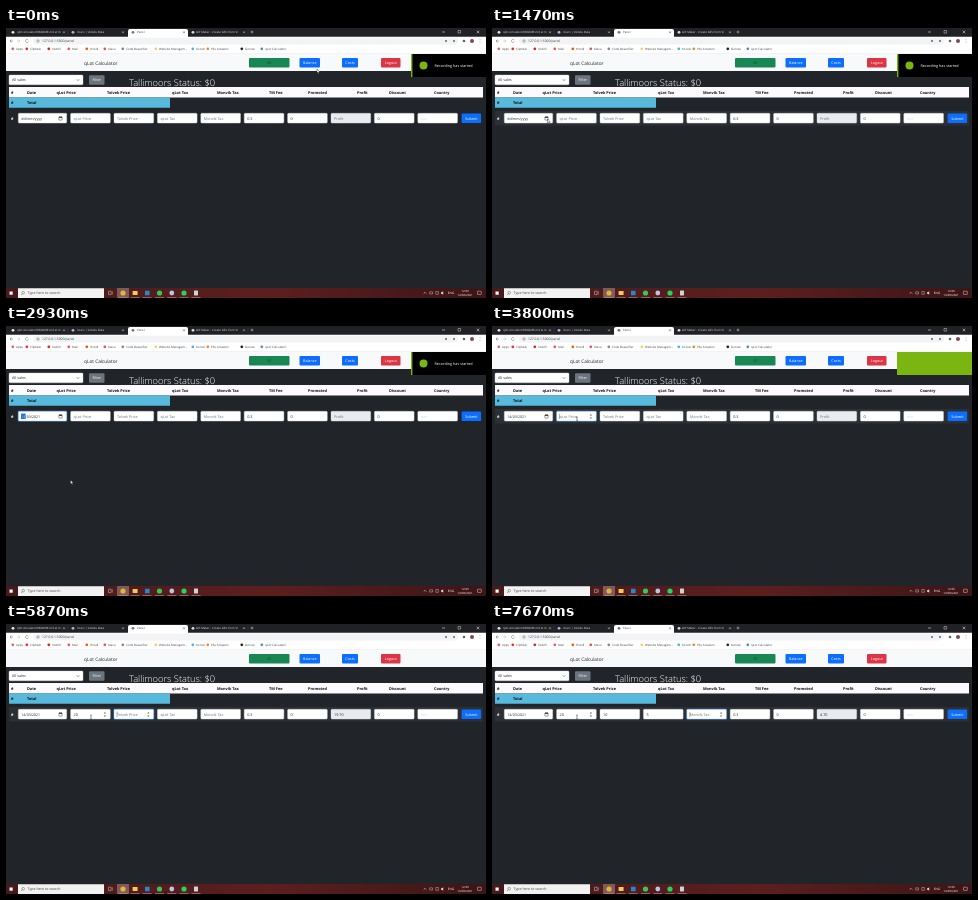
These frames come from a looping animation (480 px wide and 270 px high, 8 s). An HTML page with a canvas:

```html
<!DOCTYPE html>
<html lang="en">
<head>
<meta charset="utf-8">
<title>Sales panel</title>
<style>
html, body { margin: 0; width: 100%; height: 100%; overflow: hidden; background: #212529; }
canvas { display: block; width: 100vw; height: 100vh; }
</style>
</head>
<body>
<canvas id="stage"></canvas>
<script>
const LOOP = 8000, W = 480, H = 270;
const canvas = document.getElementById('stage');
const ctx = canvas.getContext('2d');
const BLUE = '#0d6efd', INK = '#212529', GREEN = '#7ab511';
const PICKER_OPEN = 1670, PICKED = 2800;

function box(x, y, w, h, fill, radius = 0, stroke) {
  ctx.beginPath();
  ctx.roundRect(x, y, w, h, radius);
  ctx.fillStyle = fill;
  ctx.fill();
  if (stroke) {
    ctx.strokeStyle = stroke;
    ctx.lineWidth = 0.4;
    ctx.stroke();
  }
}

function dot(x, y, r, fill) {
  ctx.beginPath();
  ctx.arc(x, y, r, 0, 7);
  ctx.fillStyle = fill;
  ctx.fill();
}

function line(points, color, width = 0.5) {
  ctx.beginPath();
  points.forEach(([x, y]) => ctx.lineTo(x, y));
  ctx.strokeStyle = color;
  ctx.lineWidth = width;
  ctx.stroke();
}

function shape(points, fill, stroke) {
  ctx.beginPath();
  points.forEach(([x, y]) => ctx.lineTo(x, y));
  ctx.closePath();
  ctx.fillStyle = fill;
  ctx.fill();
  if (stroke) {
    ctx.strokeStyle = stroke;
    ctx.lineWidth = 0.4;
    ctx.stroke();
  }
}

// y is the vertical middle of the capitals
function text(str, x, y, size, color, weight = 400, align = 'left') {
  ctx.font = `${weight} ${size}px "Open Sans", "Noto Sans", sans-serif`;
  ctx.textAlign = align;
  ctx.fillStyle = color;
  ctx.fillText(str, x, y + size * 0.36);
}

function button(label, x, y, w, h, fill, color = '#fff') {
  box(x, y, w, h, fill, 1);
  text(label, x + w / 2, y + h / 2, 3.7, color, 400, 'center');
}

function cross(x, y, r, color) {
  line([[x - r, y - r], [x + r, y + r]], color);
  line([[x - r, y + r], [x + r, y - r]], color);
}

const clamp = v => Math.max(0, Math.min(1, v));
const ease = v => v * v * (3 - 2 * v);

// Latest entry of [time, value] steps
const at = (steps, t) => steps.reduce((value, [time, next]) => t >= time ? next : value, '');

const tabs = [
  ['qlot-simulator/README.md at m', 7, 11, 58, '#e8e8e8'],
  ['Users | Velodu Data', 67, 71, 117, '#b9aee0'],
  ['Panel', 127, 131, 178, '#777'],
  ['GIF Maker - Create GIFs from Vi', 187, 190, 238, '#d8dce8']
];

const bookmarks = [
  ['Apps', 10, '#d9695f'], ['ClipNub', 24, '#f22'], ['Vodrill', 46, '#d22'],
  ['Mail', 66, '#e55'], ['thredl', 84, '#f50'], ['Klasu', 102, '#d55'],
  ['Code Beautifier', 120, '#888'], ['Website Managem...', 153, '#f3cf6a'],
  ['Korvel', 190, '#3bb8e8'], ['Pile Answers', 205, '#e8883a'],
  ['Gorvex', 239, '#222'], ['qLot Calculator', 259, '#4a8cc0']
];

const headers = [
  ['#', 5], ['Date', 21], ['qLot Price', 50.5], ['Tolvek Price', 101], ['qLot Tax', 166],
  ['Monvik Tax', 211], ['TM Fee', 263], ['Promoted', 302], ['Profit', 351],
  ['Discount', 383], ['Country', 428]
];

const fields = [
  { hint: 'qLot Price', values: [[5130, '2'], [5260, '20']], focus: [3670, 5800] },
  { hint: 'Tolvek Price', values: [[6130, '1'], [6330, '10']], focus: [5800, 6870] },
  { hint: 'qLot Tax', values: [[7130, '5']], focus: [6870, 7600] },
  { hint: 'Monvik Tax', values: [], focus: [7600, LOOP] },
  { hint: '', values: [[0, '0.3']] },
  { hint: '', values: [[0, '0']] },
  { hint: 'Profit', values: [[5200, '1.70'], [5330, '19.70'], [6270, '18.70'], [6400, '9.70'], [7270, '4.70']], disabled: true },
  { hint: '', values: [[0, '0']] },
  { hint: '-----', values: [] }
];

const pointerPath = [
  [0, 311, 41], [70, 311, 41], [870, 39, 91], [1470, 55.5, 91], [1670, 55.5, 91],
  [2130, 56, 159], [2270, 56, 159], [2400, 62.5, 160], [2600, 60, 159], [2800, 60, 159],
  [2930, 64.5, 154], [3600, 85, 93], [LOOP, 85, 93]
];

function pointerAt(t) {
  const i = pointerPath.findIndex(p => p[0] > t);
  const [t0, x0, y0] = pointerPath[i - 1], [t1, x1, y1] = pointerPath[i];
  const k = ease((t - t0) / (t1 - t0));
  return [x0 + (x1 - x0) * k, y0 + (y1 - y0) * k];
}

const inRow = ([, y]) => y > 83 && y < 97;

function drawBrowser() {
  const soft = '#5f6368';
  box(0, 0, W, 9, '#202124');
  box(122, 1, 60, 8, '#fff', [2, 2, 0, 0]);
  box(0, 8.7, W, 17.3, '#fff');
  tabs.forEach(([label, iconX, x, closeX, color], i) => {
    const ink = i === 2 ? '#3c4043' : '#dddfe2';
    dot(iconX, 4.3, 1.4, color);
    text(label, x, 4.3, 2.9, ink);
    cross(closeX, 4.3, 0.9, ink);
  });
  line([[62, 2], [62, 7]], '#55575b', 0.3);
  line([[242, 2], [242, 7]], '#55575b', 0.3);
  line([[244.5, 4], [247.5, 4]], '#ddd');
  line([[246, 2.5], [246, 5.5]], '#ddd');
  line([[436, 4], [439, 4]], '#fff');
  box(452, 2.5, 2.6, 2.6, 'transparent', 0, '#fff');
  cross(472, 4, 1.3, '#fff');

  line([[5.5, 11.5], [4, 13], [5.5, 14.5]], soft);
  line([[4, 13], [7, 13]], soft);
  line([[12.5, 11.5], [14, 13], [12.5, 14.5]], '#b5b8bc');
  line([[11, 13], [14, 13]], '#b5b8bc');
  ctx.beginPath();
  ctx.arc(21, 13, 1.5, 0.3, 5.6);
  ctx.strokeStyle = soft;
  ctx.stroke();
  box(27, 9.8, 425, 6.6, '#f1f3f4', 3.3);
  ctx.beginPath();
  ctx.arc(32, 13, 1.2, 0, 7);
  ctx.stroke();
  text('127.0.0.1:5000/panel', 36, 13, 3.3, '#3c4043');
  dot(440, 13, 1, soft);
  dot(448, 13, 1, soft);
  dot(458, 13, 1.3, soft);
  dot(466, 13, 2, '#84474f');
  for (let i = 0; i < 3; i++) dot(474, 11.7 + i * 1.3, 0.35, soft);

  for (const [label, x, color] of bookmarks) {
    dot(x - 3.2, 20.8, 1.4, color);
    text(label, x, 20.8, 3, '#3c4043');
  }
  line([[0, 25.8], [W, 25.8]], '#d5d7da', 0.4);
}

function drawPage() {
  box(0, 26, W, 234, INK);
  box(0, 26, W, 17, '#f8f9fa');
  text('qLot Calculator', 78, 34.8, 4.75, '#222');
  button('$0', 243, 30, 40.5, 9.5, '#198754', '#0c5434');
  button('Balance', 293.5, 30, 20.5, 9.5, BLUE);
  button('Costs', 336, 30, 16, 9.5, BLUE);
  button('Logout', 375, 30, 19.5, 9.5, '#dc3545');

  box(3, 47, 74, 9.8, '#fff', 1, '#ced4da');
  text('All sales', 6, 52, 3.7, INK);
  line([[70.8, 51.4], [72, 52.6], [73.2, 51.4]], '#343a40', 0.6);
  button('Filter', 83, 47.3, 15.5, 9.5, '#6c757d');
  text('Tallimoors Status: $0', 123, 54.2, 9.3, '#fff', 300);

  box(3, 59, 474, 10.4, '#fdfafd');
  headers.forEach(([label, x]) => text(label, x, 64.4, 3.85, '#111', 700));
  box(3, 69.4, 161, 10.3, '#57b9dc');
  text('#', 5, 74.5, 3.85, '#111', 700);
  text('Total', 21, 74.5, 3.85, '#111', 700);
}

function drawInput(x, w, focused, disabled) {
  if (focused) box(x - 0.9, 84.4, w + 1.8, 11.6, 'rgba(13,110,253,.35)', 1.6);
  box(x, 85.3, w, 9.8, disabled ? '#e9ecef' : '#fff', 1, focused ? '#86b7fe' : '#ced4da');
}

function drawForm(t, pointer) {
  const pickerOpen = t >= PICKER_OPEN && t < PICKED;
  box(3, 83, 474, 14.5, inRow(pointer) || pickerOpen ? '#2c3034' : INK);
  text('#', 5, 90.3, 3.85, '#fff', 700);

  const dateFocused = t >= PICKER_OPEN && t < 3670;
  const picked = t >= PICKED;
  drawInput(12.3, 48.4, dateFocused);
  if (dateFocused) box(15, 87.6, 4.6, 5.4, '#1a73e8');
  text(picked ? '14/03/2021' : 'dd/mm/yyyy', 15.3, 90.3, 3.55, INK);
  if (dateFocused) text(picked ? '14' : 'dd', 15.3, 90.3, 3.55, '#fff');
  box(52.9, 88.9, 3.2, 3.2, 'transparent', 0.3, '#111');
  box(52.9, 88.7, 3.2, 1, '#111');

  fields.forEach(({ hint, values, focus, disabled }, i) => {
    const x = 64.6 + i * 43.4;
    const focused = focus && t >= focus[0] && t < focus[1];
    const hovered = focus && inRow(pointer) && pointer[0] > x && pointer[0] < x + 39.7;
    const value = at(values, t);
    drawInput(x, 39.7, focused, disabled);
    text(value || hint, x + 3, 90.3, 3.75, value ? INK : '#6c757d');
    if (focused && !(t > 4330 && t < 4870)) {
      const caretX = x + 3 + (value ? ctx.measureText(value).width : 0);
      line([[caretX, 87.8], [caretX, 93]], '#222', 0.35);
    }
    if (focused || hovered) {
      const sx = x + 34.3;
      shape([[sx - 1.2, 89.6], [sx, 88.1], [sx + 1.2, 89.6]], '#666');
      shape([[sx - 1.2, 91.5], [sx, 93], [sx + 1.2, 91.5]], '#666');
    }
  });
  button('Submit', 455.6, 85.4, 19.5, 9.7, BLUE);
  if (pickerOpen) drawPicker();
}

function drawPicker() {
  box(12.3, 96, 54.7, 69.3, '#fff', 0.5, '#aaa');
  text('March 2021', 15, 101, 3.2, '#222', 600);
  shape([[33.3, 100.5], [35, 100.5], [34.15, 101.7]], '#222');
  for (const [x, dir] of [[52.5, -1], [60.5, 1]]) {
    line([[x, 99], [x, 103]], '#333', 0.4);
    line([[x - 1.3, 101 + dir * 0.7], [x, 101 + dir * 2], [x + 1.3, 101 + dir * 0.7]], '#333', 0.4);
  }
  ['Su', 'Mo', 'Tu', 'We', 'Th', 'Fr', 'Sa'].forEach((day, i) =>
    text(day, 18.6 + i * 7, 110, 2.9, '#333', 400, 'center'));
  box(15.2, 127.8, 6.8, 6.6, '#1a73e8', 0.5);
  for (let i = 0; i < 42; i++) {
    const date = new Date(2021, 1, 28 + i);
    const color = i === 14 ? '#fff' : date.getMonth() === 2 ? '#222' : '#777';
    text(date.getDate(), 18.6 + i % 7 * 7, 117.3 + Math.floor(i / 7) * 7, 2.9, color, 400, 'center');
  }
  text('Today', 57.3, 160, 3.1, '#1a73e8', 400, 'center');
}

function drawTaskbar() {
  const fill = ctx.createLinearGradient(0, 0, W, 0);
  fill.addColorStop(0, '#46191a');
  fill.addColorStop(0.55, '#5c1f1e');
  fill.addColorStop(1, '#3c1516');
  box(0, 260, W, 10, fill);
  box(3.5, 263.5, 3.2, 3.2, '#fff');
  box(12, 260.3, 86, 9.7, '#f2f2f2');
  ctx.beginPath();
  ctx.arc(17.2, 264.7, 1.3, 0, 7);
  ctx.strokeStyle = '#333';
  ctx.lineWidth = 0.4;
  ctx.stroke();
  line([[16.3, 265.7], [15.3, 266.8]], '#333');
  text('Type here to search', 21.5, 265, 3.6, '#444');
  box(102.5, 263.2, 2.6, 3.4, 'transparent', 0, '#eee');
  line([[106.3, 263.2], [106.3, 266.6]], '#eee', 0.4);
  box(111, 260, 12, 10, '#80595a');
  dot(117, 265, 2.6, '#e2b53a');
  box(126.6, 263, 5, 4, '#f3c95a', 0.4);
  box(139, 262.7, 4.6, 4.6, '#2489ca', 0.4);
  dot(153.5, 265, 2.6, '#35c75a');
  dot(165.8, 265, 2.4, '#b9c4e8');
  dot(178, 265, 2.6, '#1ed760');
  box(188, 262.5, 4, 5, '#ccd2d6', 0.4);
  for (const x of [117, 129, 141, 153.5, 165.8, 178, 190]) {
    line([[x - 4.5, 269.6], [x + 4.5, 269.6]], '#d99', 0.6);
  }

  line([[417.7, 265.6], [419, 264.3], [420.3, 265.6]], '#fff');
  box(423.7, 263.8, 2.8, 2.2, 'transparent', 0, '#ddd');
  box(429.8, 263.5, 2.6, 2.8, 'transparent', 0, '#ddd');
  shape([[435, 264.3], [436, 264.3], [437.2, 263.2], [437.2, 266.8], [436, 265.7], [435, 265.7]], '#ddd');
  text('ENG', 445, 265, 3.1, '#fff', 400, 'center');
  text('12:09', 459, 262.8, 2.9, '#fff', 400, 'center');
  text('14/03/2021', 459, 267.3, 2.9, '#fff', 400, 'center');
  box(471.5, 263.2, 3.8, 3.2, 'transparent', 0.3, '#fff');
}

// Green covers the message from the left, then leaves to the right
function drawToast(t) {
  const wipe = 75 * ease(clamp((t - 3500) / 270));
  const slide = 75 * ease(clamp((t - 3800) / 200));
  if (wipe < 75) {
    box(405, 26, 75, 23, '#000');
    dot(417.5, 37.6, 4, GREEN);
    text('Recording has started', 428.5, 37.6, 3.75, '#fff');
  }
  box(405 + slide, 26, Math.max(1.4, wipe), 23, GREEN);
}

function drawPointer(pointer) {
  const [x, y] = pointer;
  const overText = inRow(pointer) && (x < 52 || x > 64.6);
  if (overText) {
    line([[x, y - 2], [x, y + 2]], '#222', 0.5);
    line([[x - 0.8, y - 2], [x + 0.8, y - 2]], '#222', 0.4);
    line([[x - 0.8, y + 2], [x + 0.8, y + 2]], '#222', 0.4);
    return;
  }
  const arrow = [[0, 0], [0, 4], [0.9, 3.2], [1.6, 4.7], [2.2, 4.4], [1.6, 3], [2.8, 3]];
  shape(arrow.map(([dx, dy]) => [x + dx, y + dy]), '#fff', '#111');
}

function frame(now) {
  const t = now % LOOP;
  const ratio = window.devicePixelRatio || 1;
  const width = Math.round(innerWidth * ratio), height = Math.round(innerHeight * ratio);
  if (canvas.width !== width || canvas.height !== height) {
    canvas.width = width;
    canvas.height = height;
  }
  ctx.setTransform(width / W, 0, 0, height / H, 0, 0);
  ctx.textRendering = 'geometricPrecision';
  const pointer = pointerAt(t);
  drawBrowser();
  drawPage();
  drawForm(t, pointer);
  drawTaskbar();
  drawToast(t);
  drawPointer(pointer);
  requestAnimationFrame(frame);
}
requestAnimationFrame(frame);
</script>
</body>
</html>
```
